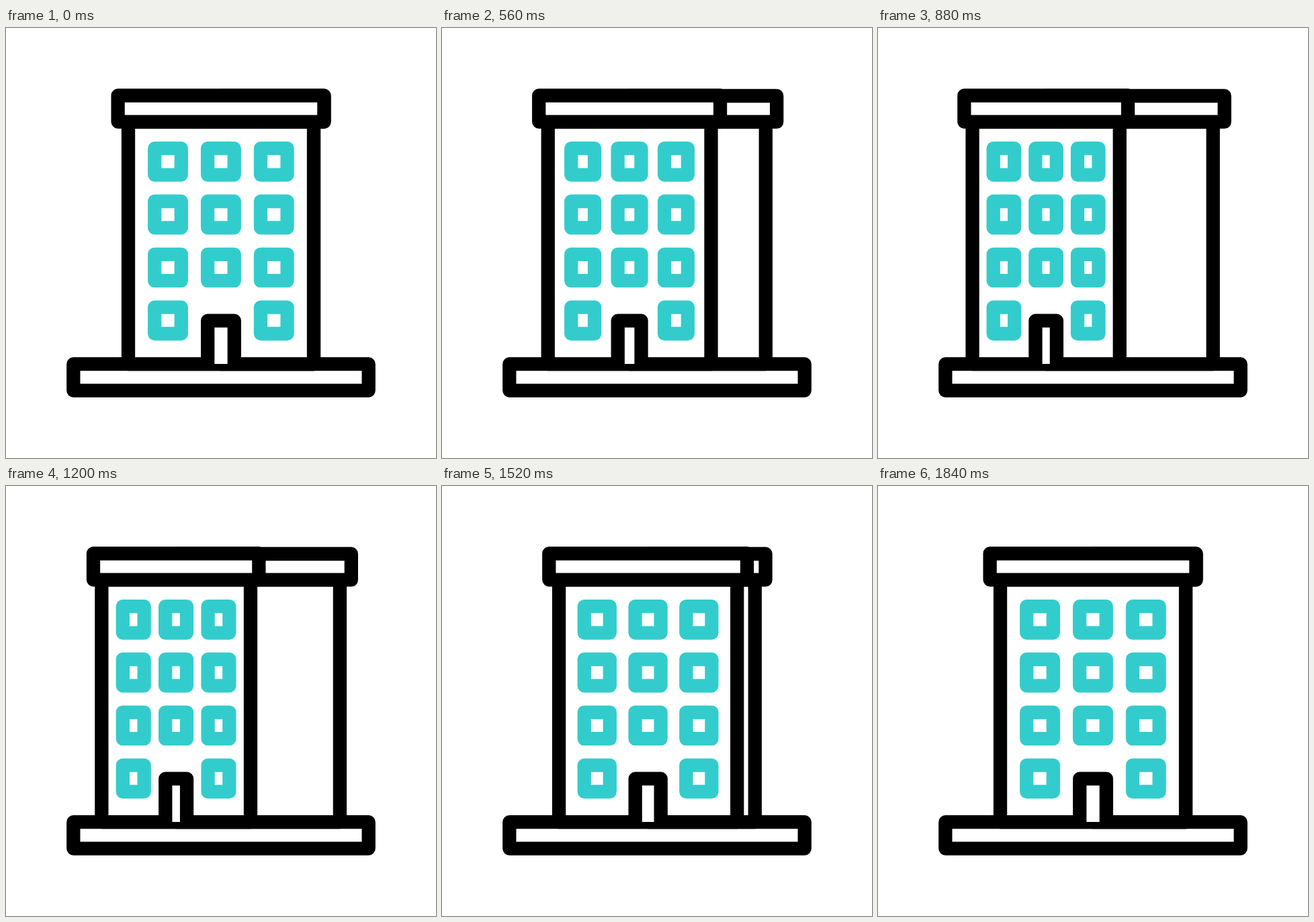
Write an HTML page that moves like this. It is 640x640 px and loops after 2000 ms.

```html
<!DOCTYPE html>
<html lang="en">
<head>
<meta charset="utf-8">
<title>Building</title>
<style>
  html, body { margin: 0; width: 100%; height: 100%; overflow: hidden; background: #fff; }
  svg { display: block; width: 100%; height: 100%; }
  path { fill: #fff; stroke: #000; stroke-width: 20.3; stroke-linejoin: round; }
  .window { stroke: #33cccc; }
</style>
</head>
<body>
<svg id="stage" viewBox="0 0 640 640"></svg>
<script>
const stage = document.getElementById('stage');
const LOOP = 2000, STEP = 40, REACH = 1.01;

function addPath(className = '') {
  const path = document.createElementNS('http://www.w3.org/2000/svg', 'path');
  path.setAttribute('class', className);
  return stage.appendChild(path);
}

const box = (x1, y1, x2, y2) => `M${x1} ${y1}H${x2}V${y2}H${x1}Z`;
const draw = (path, d) => path.setAttribute('d', d);

// Creation order is stacking order.
const base = addPath();
const sideWall = addPath();
const sideRoof = addPath();
const frontWall = addPath();
const frontRoof = addPath();
const windows = [];
for (let row = 0; row < 4; row++) {
  for (let col = 0; col < 3; col++) {
    if (row === 3 && col === 1) continue; // the door stands here
    windows.push({ path: addPath('window'), x: 221.2 + col * 78.9, y: 179.2 + row * 78.8 });
  }
}
const door = addPath();
draw(base, box(100.3, 500.2, 539.7, 539.6));

// Cubic Bezier easing with control points (.83, 0) and (.27, 1).
function ease(u) {
  if (u <= 0) return 0;
  if (u >= 1) return 1;
  let low = 0, high = 1, s;
  for (let i = 0; i < 30; i++) {
    s = (low + high) / 2;
    const r = 1 - s;
    const x = 3 * r * r * s * 0.83 + 3 * r * s * s * 0.27 + s * s * s;
    if (x < u) low = s; else high = s;
  }
  return s * s * (3 - 2 * s);
}

function render(time) {
  const t = Math.floor((time % LOOP) / STEP) * STEP;
  const turn = REACH * (ease((t - 60) / 900) - ease((t - 970) / 870));
  // The front narrows and slides left while line weights stay constant.
  const front = x => x - turn * (0.2049 * x + 3.99);

  draw(sideWall, box(front(320), 139.6, 458 + 40.5 * turn, 500.2));
  draw(sideRoof, box(front(320), 101, 473.5 + 42 * turn, 139.7));
  draw(frontWall, box(front(182), 139.6, front(458), 500.2));
  draw(frontRoof, box(front(166.6), 100.5, front(473.4), 139.6));
  for (const { path, x, y } of windows) {
    draw(path, box(front(x), y, front(x + 39.6), y + 39.4));
  }
  draw(door, `M${front(300.2)} 500V435.6H${front(339.8)}V500`);
}

const start = performance.now();
function tick() {
  render(performance.now() - start);
  requestAnimationFrame(tick);
}
render(0);
requestAnimationFrame(tick);
</script>
</body>
</html>
```
